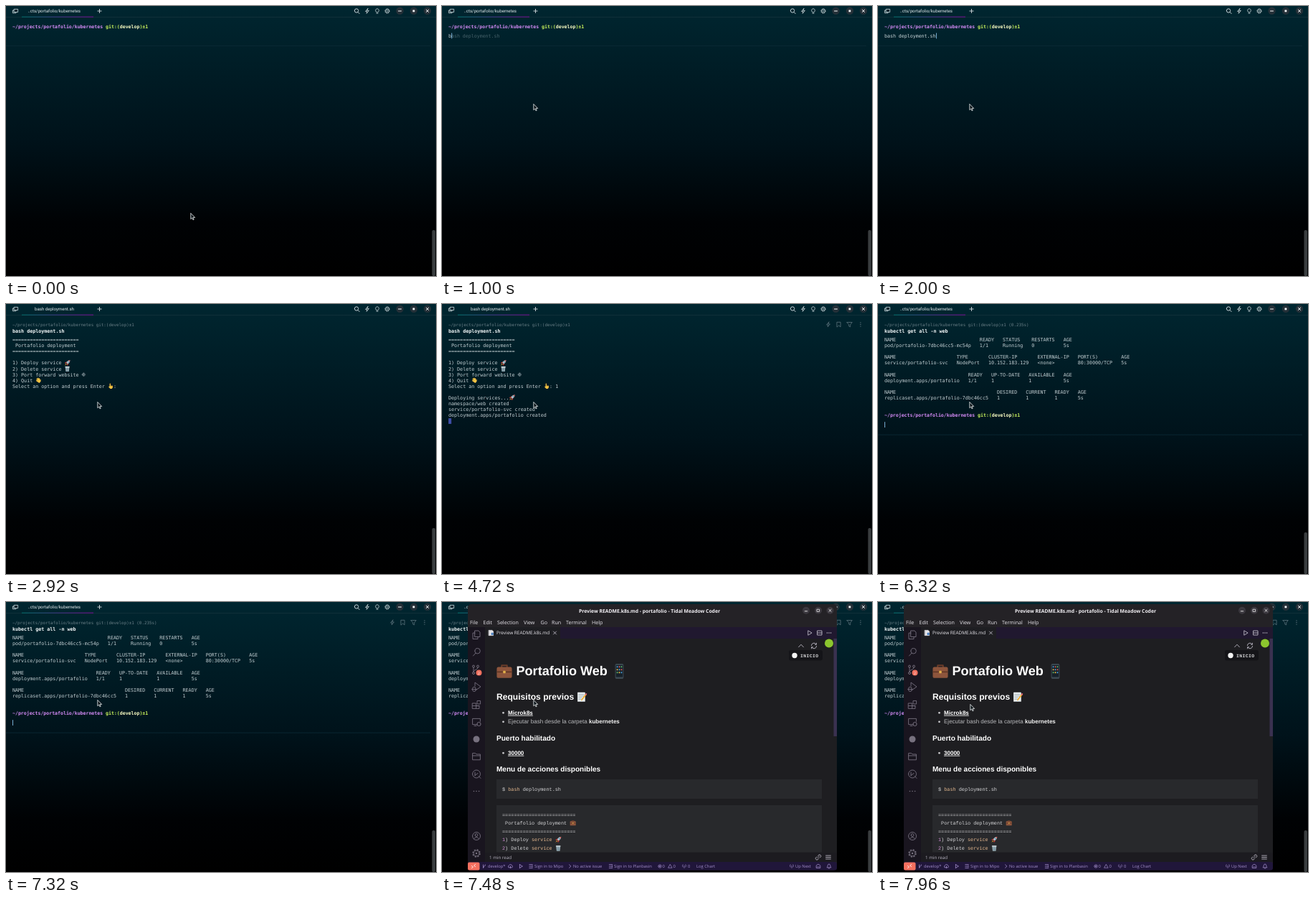
Recreate the animation shown at these times as an HTML page. Size 600 by 376 pixels, loop 8000 ms.

```html
<!DOCTYPE html>
<html lang="es">
<head>
<meta charset="utf-8">
<title>Portafolio deployment</title>
<style>
html, body { margin: 0; width: 100%; height: 100%; overflow: hidden; background: #000; }
svg { display: block; width: 100vw; height: 100vh; }
text { white-space: pre; text-rendering: geometricPrecision; }
.mono { font: 6.7px "DejaVu Sans Mono", monospace; fill: #c3ced2; }
.in { font: 6.6px "DejaVu Sans Mono", monospace; fill: #ccd6da; }
.cmd { font: bold 6.7px "DejaVu Sans Mono", monospace; fill: #f4f8f9; }
.ps { font: bold 6.55px "DejaVu Sans Mono", monospace; }
.dim { font: 5.88px "DejaVu Sans Mono", monospace; fill: #6a7f87; }
.tab { font: 6.13px Roboto, sans-serif; fill: #e4eaec; }
.ui { font: 7.1px "Open Sans", sans-serif; fill: #e8e6ec; }
.bar { font: 5.8px "Open Sans", sans-serif; fill: #a18dc8; }
.doc { font: 8.04px "Liberation Sans", sans-serif; fill: #b9babd; }
.hd { font-family: "Liberation Sans", sans-serif; font-weight: bold; fill: #fff; }
.code { font: 6.83px "Liberation Mono", monospace; fill: #d4d4d6; }
</style>
</head>
<body>
<svg id="stage" viewBox="0 0 600 376">
  <defs>
    <linearGradient id="bg" x2="0" y2="1">
      <stop offset="0" stop-color="#002630"/>
      <stop offset=".5" stop-color="#00121a"/>
      <stop offset=".8" stop-color="#000204"/>
      <stop offset="1" stop-color="#000"/>
    </linearGradient>
    <linearGradient id="accent">
      <stop offset="0" stop-color="#007972"/>
      <stop offset=".5" stop-color="#4a3a92"/>
      <stop offset="1" stop-color="#8a0aa0"/>
    </linearGradient>
  </defs>
</svg>
<script>
const LOOP = 8000, CELL = 4.033, ROW = 8.06, LEFT = 9;
// Scene times in ms
const TYPE = 1000, ACCEPT = 1520, RUN = 2760, MENU = 2840, CLEAR = 5240, GET = 6000, TABLE = 6160, EDITOR = 7480;
const stage = document.getElementById('stage');
const layers = [];
let into = stage;

function add(tag, attrs, text) {
  const el = document.createElementNS('http://www.w3.org/2000/svg', tag);
  for (const k in attrs) el.setAttribute(k, attrs[k]);
  if (text !== undefined) el.textContent = text;
  into.append(el);
  return el;
}
function group(build, attrs = {}) {
  const outer = into, g = add('g', attrs);
  into = g;
  build();
  into = outer;
  return g;
}
// Shows a group only inside the given [start, end] spans
function during(spans, build) {
  layers.push({ spans, el: group(build) });
}
const rect = (x, y, width, height, fill, rx = 0) => add('rect', { x, y, width, height, fill, rx });
const dot = (cx, cy, r, fill) => add('circle', { cx, cy, r, fill });
const label = (x, y, cls, text, extra = {}) => add('text', { x, y, class: cls, ...extra }, text);
const line = (x, y, d, stroke, w = .9, fill = 'none') => add('path', {
  d, stroke, fill, 'stroke-width': w, transform: `translate(${x} ${y})`,
  'stroke-linecap': 'round', 'stroke-linejoin': 'round'
});
const shape = (d, fill) => add('path', { d, fill });
// A text line made of [string, colour] pieces
function pieces(x, y, cls, parts) {
  const t = label(x, y, cls, '');
  const outer = into;
  into = t;
  for (const [s, fill] of parts) add('tspan', fill ? { fill } : {}, s);
  into = outer;
}

// Pictograms on a 10 x 10 grid
const picts = {
  rocket() {
    shape('M9.8.2C6.8.3 4.5 2 3.1 4.6L5.4 6.9C8 5.5 9.7 3.2 9.8.2Z', '#b9c8d0');
    shape('M9.8.2 7.2.9 9.1 2.8ZM4.2 3.4 1.4 4 .4 6 3.1 5.6ZM6.6 5.8 6 8.6 4 9.6 4.4 6.9Z', '#d9453d');
    shape('M2.8 6.2.4 9.6 3.9 7.3Z', '#f3a72f');
    dot(6.8, 3.3, 1, '#3e7fa5');
  },
  bin() {
    shape('M1.5 2.5H8.5L7.7 9.8H2.3Z', '#9fb4bd');
    rect(1, 1, 8, 1.8, '#d7e3e7', .8);
    line(0, 0, 'M3.4 4 3.8 8.6M5 4V8.6M6.6 4 6.2 8.6', '#5d7884', .6);
  },
  globe() {
    line(5, 5, 'M-3.2 0A3.2 3.2 0 1 1 3.2 0 3.2 3.2 0 1 1-3.2 0ZM-3.2 0H3.2M0-3.2V3.2M0-3.2C-2-1-2 1 0 3.2 2 1 2-1 0-3.2', '#a9b6bb', .6);
  },
  wave() {
    line(0, 0, 'M4 6 2 3.2M5 5 3 1.7M6 4.6 4.7 1.3M7 5 6.6 2M4 7.4 1.6 5.6', '#f6c443', 1.4);
    shape('M3 6 7.4 4 9.2 3.4 9 7.2 6.6 9.6 4.2 8.6Z', '#f6c443');
  },
  point() {
    line(0, 0, 'M4 6V1', '#f6c443', 1.6);
    shape('M3 4.4 8.4 4.4 8.6 7.4 7 9.8H4.2L1.2 6.4 2.2 5.6 3.2 6.2Z', '#f6c443');
    line(0, 0, 'M5.3 4.6V6.4M6.9 4.6V6.4', '#b9812a', .4);
  },
  brief() {
    line(0, 0, 'M3.3 2.4V1.2H6.7V2.4', '#6b3d2a', .9);
    rect(.2, 2.2, 9.6, 7, '#8d553c', 1);
    rect(.2, 5, 9.6, .7, '#5d3524');
    rect(4.2, 4.6, 1.6, 1.6, '#e2b04a', .3);
  },
  phone() {
    rect(2.2, 0, 5.6, 10, '#3d4a52', .9);
    rect(2.7, .9, 4.6, 7.9, '#17212a');
    const tint = ['#4aa3e0', '#f0b840', '#62c06a', '#e2564f'];
    for (let i = 0; i < 9; i++) rect(3.2 + i % 3 * 1.4, 1.6 + (i / 3 | 0) * 1.9, .8, .9, tint[i * 3 % 4], .2);
  },
  memo() {
    rect(.8, .6, 7.6, 9.2, '#e9eef0', .4);
    line(0, 0, 'M2 2.6H7M2 4.2H7M2 5.8H5M2 7.4H4.4', '#8b9aa2', .5);
    line(0, 0, 'M9.2 2.6 5 8', '#f2b135', 1.3);
    line(0, 0, 'M9.5 2.2 9 2.8', '#e2647a', 1.3);
  }
};
const pict = (name, x, y, size) =>
  group(picts[name], { transform: `translate(${x} ${y}) scale(${size / 10})` });

// Terminal helpers
const base = r => 52.2 + r * ROW;
const col = c => LEFT + c * CELL;
const out = (r, text) => label(LEFT, base(r), 'mono', text);
const small = (name, r, c) => pict(name, col(c), base(r) - 6.4, 8);
const block = (r, c) => rect(col(c), base(r) - 5.9, 4.1, 7.8, '#3d4da6');
const caret = (x, y) => rect(x, y - 6, .9, 7.8, '#86bfe6');
const rule = y => rect(0, y, 592, .8, '#0c2b36');
function prompt(y) {
  pieces(LEFT, y, 'ps', [['~/projects/portafolio/kubernetes ', '#d58bf6'], ['git:(', '#c6f05c'],
    ['develop', '#fbfdc4'], [')±1', '#c6f05c']]);
}
function ranBlock(time, cmd) {
  label(LEFT, 30.5, 'dim', '~/projects/portafolio/kubernetes git:(develop)±1' + time);
  label(LEFT, 39.8, 'cmd', cmd);
}
const bolt = 'M.8-3.4-2.4.6H-.2L-.8 3.4 2.4-.6H.2Z';

// Background and top bar
rect(0, 0, 600, 376, 'url(#bg)');
rect(0, 15, 600, .7, '#17343d');
rect(22, 14.7, 100, .9, 'url(#accent)');
const pale = '#d5dde0';
line(13, 7, 'M-1.5-2.6H3.6V1.6H-1.5ZM-2-1H-3.6V2.8H1V2', pale, .8);
line(130.5, 7, 'M-2.6 0H2.6M0-2.6V2.6', pale);
line(489, 6.5, 'M-2.7 0A2.7 2.7 0 1 1 2.7 0 2.7 2.7 0 1 1-2.7 0M2 2 4.2 4.2', pale);
line(504, 7, bolt, pale, .8);
line(518, 7, 'M-1.2 1.6C-3.4-.4-2.2-3.2 0-3.2S3.4-.4 1.2 1.6ZM-1 3.2H1', pale, .8);
const gear = (x, y, c, s = 1) => {
  add('circle', { cx: x, cy: y, r: 3.1 * s, fill: 'none', stroke: c, 'stroke-width': .9 * s, 'stroke-dasharray': `${1.4 * s} ${1.03 * s}` });
  add('circle', { cx: x, cy: y, r: 2.4 * s, fill: 'none', stroke: c, 'stroke-width': .8 });
  dot(x, y, .8 * s, c);
};
gear(532, 7, pale);
for (const x of [549.5, 569, 588]) dot(x, 6.8, 5.2, '#243038');
line(549.5, 7, 'M-2 0H2', '#fff', 1);
rect(567.5, 5.5, 2.8, 2.8, '#fff');
line(588, 6.8, 'M-1.6-1.6 1.6 1.6M1.6-1.6-1.6 1.6', '#fff', 1);
during([[0, MENU], [CLEAR, LOOP]], () => label(30.5, 9.2, 'tab', '..cts/portafolio/kubernetes'));
during([[MENU, CLEAR]], () => label(40, 9.2, 'tab', 'bash deployment.sh'));
during([[0, CLEAR]], () => rect(594.5, 312, 4.5, 64, '#3a3e40', 2));
during([[CLEAR, LOOP]], () => rect(594.5, 318, 4.5, 58, '#3a3e40', 2));

// Empty prompt, first command
during([[0, RUN], [CLEAR, GET]], () => { prompt(30.6); rule(55); });
during([[720, TYPE]], () => caret(LEFT, 43.6));
during([[TYPE, ACCEPT]], () => {
  pieces(LEFT, 43.6, 'in', [['b'], ['ash deployment.sh', '#47626b']]);
  caret(13.2, 43.6);
});
during([[ACCEPT, RUN]], () => {
  label(LEFT, 43.6, 'in', 'bash deployment.sh');
  caret(81, 43.6);
});

// Deployment menu
during([[RUN, CLEAR]], () => ranBlock('', 'bash deployment.sh'));
during([[RUN, MENU]], () => block(0, 0));
during([[MENU, CLEAR]], () => {
  const bars = '='.repeat(23);
  [bars, ' Portafolio deployment', bars, '', '1) Deploy service', '2) Delete service', '3) Port forward website',
    '4) Quit', 'Select an option and press Enter   :'].forEach((s, r) => out(r, s));
  small('rocket', 4, 18);
  small('bin', 5, 18);
  pict('globe', col(24) - .8, base(6) - 5.6, 6.6);
  small('wave', 7, 8);
  small('point', 8, 33);
});
during([[3200, 3600]], () => block(8, 37));
during([[3600, CLEAR]], () => label(col(37), base(8), 'mono', '1'));
during([[3600, 4000]], () => block(8, 38));
during([[4000, CLEAR]], () => { out(10, 'Deploying services...'); small('rocket', 10, 21); });
[[4240, 'namespace/web created'], [4480, 'service/portafolio-svc created'],
  [4720, 'deployment.apps/portafolio created']].forEach(([at, text], i) => {
  during([[at, CLEAR]], () => out(11 + i, text));
});
[4000, 4240, 4480, 4720, CLEAR].forEach((at, i, all) => {
  if (i < 4) during([[at, all[i + 1]]], () => block(11 + i, 0));
});

// Second command
during([[CLEAR, GET]], () => {
  pieces(LEFT, 43.6, 'in', [['kubectl', '#b4ea66'], [' get all -n web']]);
  caret(96.6, 43.6);
});
during([[GET, TABLE]], () => ranBlock('', 'kubectl get all -n web'));
during([[TABLE, LOOP]], () => {
  ranBlock(' (0.235s)', 'kubectl get all -n web');
  const table = (row, widths, ...lines) => lines.forEach((cells, i) =>
    out(row + i, cells.split(' ').map((c, k) => c.padEnd(widths[k])).join('')));
  table(0, [33, 8, 10, 11, 3], 'NAME READY STATUS RESTARTS AGE',
    'pod/portafolio-7dbc46cc5-mc54p 1/1 Running 0 5s');
  table(3, [25, 11, 17, 14, 15, 3], 'NAME TYPE CLUSTER-IP EXTERNAL-IP PORT(S) AGE',
    'service/portafolio-svc NodePort 10.152.183.129 <none> 80:30000/TCP 5s');
  table(6, [29, 8, 13, 12, 3], 'NAME READY UP-TO-DATE AVAILABLE AGE',
    'deployment.apps/portafolio 1/1 1 1 5s');
  table(9, [39, 10, 10, 8, 3], 'NAME DESIRED CURRENT READY AGE',
    'replicaset.apps/portafolio-7dbc46cc5 1 1 1 5s');
  prompt(157.3);
});
during([[TABLE, EDITOR]], () => rule(181.7));
during([[TABLE, 6520], [7000, EDITOR]], () => caret(LEFT, 170.2));
during([[3200, CLEAR], [6520, LOOP]], () => {
  const c = '#5d747d';
  line(539, 28.5, bolt, c, .8);
  line(553.7, 28.5, 'M-2.4-3.2H2.4V3.4L0 1.4-2.4 3.4Z', c, .8);
  line(568.7, 28.5, 'M-3.6-3H3.6L1 .4V3.4L-1 2.4V.4Z', c, .8);
  for (const d of [-2.6, 0, 2.6]) dot(584, 28.5 + d, .7, c);
});

// Editor window
during([[EDITOR, LOOP]], () => {
  const grey = '#77717f', soft = '#bcb8c4', violet = '#a18dc8';
  rect(36, 3, 515, 370.5, '#242226', 5);
  rect(36, 35, 24, 327, '#19151f');
  rect(60, 35, 491, 16, '#20182f');
  rect(60, 35, 105, 16, '#1e1e22');
  rect(60, 51, 491, 298, '#1e1e21');
  rect(60, 349, 491, 13, '#1c1b20');
  rect(36, 362, 515, 11.5, '#20163a', 3);
  label(191, 14.5, 'ui', 'Preview README.k8s.md - portafolio - Tidal Meadow Coder', { style: 'font-size:6.8px;font-weight:bold;fill:#f4f2f6' });
  for (const x of [508, 525, 541.5]) dot(x, 11.8, 5, '#3b383f');
  line(508, 12.8, 'M-1.7 0H1.7', '#eee');
  line(525, 11.8, 'M-1.6-1.6H1.6V1.6H-1.6Z', '#eee', .8);
  line(541.5, 11.8, 'M-1.6-1.6 1.6 1.6M1.6-1.6-1.6 1.6', '#eee');
  [[39, 'File'], [57.5, 'Edit'], [77, 'Selection'], [114, 'View'], [137.5, 'Go'], [153, 'Run'],
    [173, 'Terminal'], [209, 'Help']].forEach(([x, s]) => label(x, 30.5, 'ui', s));
  line(68.5, 43, 'M-3-3.6H1.6L3-2V3.6H-3Z', '#e6e6ea', .8, '#e6e6ea');
  dot(70.2, 44.4, 1.8, '#4a80c0');
  label(76, 45.3, 'ui', 'Preview README.k8s.md', { style: 'font-size:6.45px' });
  line(157.5, 43, 'M-2-2 2 2M2-2-2 2', soft);
  line(513.5, 43, 'M-2.4-3 2.6 0-2.4 3Z', soft);
  line(527, 43, 'M-3-3H3V3H-3ZM-3 0H3', soft);
  for (const d of [-2.6, 0, 2.6]) dot(540 + d, 43, .8, soft);

  // Activity bar
  line(48, 45.5, 'M-2-5.5H3L5-3.4V3H-2ZM-2-2.4H-5V6H2V3', grey);
  line(48.5, 69, 'M-2.6-.8A3.7 3.7 0 1 1 4.8-.8 3.7 3.7 0 1 1-2.6-.8M-1.4 2-5 6', grey);
  line(47, 94, 'M-3-3V4M3-3C3 1-3 0-3 3', grey);
  for (const [x, y] of [[44, 89.6], [44, 99], [50, 89.6]]) add('circle', { cx: x, cy: y, r: 1.5, fill: '#19151f', stroke: grey });
  dot(51.5, 98.5, 4, '#f0705f');
  label(50, 100.5, 'bar', '2', { style: 'fill:#fff;font-size:5px' });
  line(48, 118, 'M-2-1V-6L6 0-1 5M-5.4 2.5A2.2 2.2 0 1 1-1 2.5V4.4A2.2 2.2 0 1 1-5.4 4.4ZM-6.4 3.6H0', grey);
  line(48, 143, 'M-5.4-2H-.4V5.4H-5.4ZM-5.4 1.6H4V5.4H-.4M1.4-5.4H5.6V-1H1.4ZM-.4 1.6H4', grey);
  line(48, 167, 'M1 3.6H-5.4V-4.6H5.4V-.6M-3 5.4H0', grey);
  add('circle', { cx: 51.5, cy: 170, r: 2.6, fill: 'none', stroke: grey });
  dot(48, 191, 4.5, grey);
  line(48, 215, 'M-5.4 4.4V-4.4H-1.4L0-3H5.4V4.4ZM-5.4-1H5.4', grey);
  line(48, 239.5, 'M-5.5 0A5.5 5.5 0 1 1 5.5 0 5.5 5.5 0 1 1-5.5 0M-2-2.4V2.4M2-1C2 1-2 0-2 2M3 3 6 6', grey);
  for (const d of [-3.6, 0, 3.6]) dot(48 + d, 263.5, .8, grey);
  line(48, 326, 'M-5.5 0A5.5 5.5 0 1 1 5.5 0 5.5 5.5 0 1 1-5.5 0M-1.9-1.4A1.9 1.9 0 1 1 1.9-1.4 1.9 1.9 0 1 1-1.9-1.4M-3.4 4C-3 .8 3 .8 3.4 4', grey);
  gear(48, 350, grey, 1.6);

  // Preview
  line(501, 61, 'M-3.4 1.8 0-1.8 3.4 1.8', soft);
  line(519, 61, 'M-3.6-.4A3.6 3.6 0 0 1 3-2.2M3.4-3.8V-1.8H1.4M3.6.4A3.6 3.6 0 0 1-3 2.2M-3.4 3.8V1.8H-1.4', soft);
  rect(484, 67, 47, 14.5, '#141418', 3);
  dot(492, 74.5, 3.7, '#f2f2f2');
  label(500, 76.9, 'code', 'INICIO', { style: 'font-size:6.4px;font-weight:bold;letter-spacing:.4px' });
  rect(546.5, 51, 4.5, 136, '#3a3150');
  dot(540, 57.5, 6, '#8cc62e');
  pict('brief', 76, 85.6, 22);
  label(103.5, 102.3, 'hd', 'Portafolio Web', { 'font-size': 18.1 });
  pict('phone', 237, 86, 21);
  label(76, 136.2, 'hd', 'Requisitos previos', { 'font-size': 12.1 });
  pict('memo', 188, 125, 14);
  const link = { style: 'font-weight:bold;fill:#fff;text-decoration:underline' };
  label(92, 156.8, 'doc', 'Microk8s', link);
  const item = label(92, 169.2, 'doc', 'Ejecutar bash desde la carpeta ');
  item.append(add('tspan', { style: 'font-weight:bold;fill:#f2f2f2' }, 'kubernetes'));
  label(76, 193, 'hd', 'Puerto habilitado', { 'font-size': 10.05 });
  label(92, 212.8, 'doc', '30000', link);
  for (const y of [154.3, 166.8, 210.3]) dot(85.5, y, 1.4, '#c8c8ca');
  label(76, 236.4, 'hd', 'Menu de acciones disponibles', { 'font-size': 10.05 });
  rect(76, 247, 454, 27, '#28292c');
  rect(76, 283, 454, 65.5, '#28292c');
  const tan = '#e3b78e', pink = '#cf8fd2';
  pieces(84, 262.6, 'code', [['$ '], ['bash', tan], [' deployment.sh']]);
  label(84, 298.6, 'code', '='.repeat(25));
  label(84, 310.2, 'code', ' Portafolio deployment');
  pict('brief', 178.5, 303.5, 8.4);
  label(84, 321.8, 'code', '='.repeat(25));
  pieces(84, 333.4, 'code', [['1', pink], [') Deploy '], ['service', tan]]);
  pict('rocket', 158, 326.8, 8.4);
  pieces(84, 345, 'code', [['2', pink], [') Delete '], ['service', tan]]);
  pict('bin', 158, 338.4, 8.4);
  label(66, 357.8, 'bar', '1 min read', { style: 'font-size:6.2px;fill:#b9b5c2' });
  line(525, 355.5, 'M-1 1 1.4-1.4M-.4-2 1-3.4A2 2 0 0 1 3.6-.8L2.2.6M.4 2-1 3.4A2 2 0 0 1-3.6.8L-2.2-.6', soft);
  line(539, 355.5, 'M-3.4-2.4H3.4M-3.4 0H3.4M-3.4 2.4H3.4', soft);

  // Status bar
  rect(36, 362.5, 16.5, 11, '#f4705f', 2);
  line(44, 368, 'M-2.6-.6-.6 1-2.6 2.6M2.6-2.6.6-1 2.6.6', '#fff', .8);
  line(59, 368, 'M-1.4-2V2M1.4-2C1.4.6-1.4 0-1.4 2', violet);
  line(95.5, 368, 'M-2.8 1.4A2.2 2.2 0 0 1-2-1.4 2.4 2.4 0 0 1 2.2-1 1.6 1.6 0 0 1 2.4 1.6ZM0 2.6V0', violet, .8);
  line(110, 368, 'M-1.6-2.6V2.6M-1.6-2.4 2.4 0-1.6 2.4', violet, .8);
  for (const x of [124, 235.5]) line(x, 368, 'M-2.2-2.4H2.2M-2.2 0H1M-2.2 2.4H2.2M2-1V1', violet, .8);
  line(178.5, 368, 'M-1-2.2 1.4 0-1 2.2', violet, .8);
  [[64, 'develop*'], [129, 'Sign in to Mipo'], [183, 'No active issue'], [240, 'Sign in to Planbasin'],
    [307.5, '0'], [322.5, '0'], [343, '0'], [355, 'Log Chart'], [493, 'Up Next']]
    .forEach(([x, s]) => label(x, 370.1, 'bar', s));
  line(304, 368, 'M-2.2 0A2.2 2.2 0 1 1 2.2 0 2.2 2.2 0 1 1-2.2 0M-.9-.9.9.9M.9-.9-.9.9', violet, .7);
  line(318.5, 368, 'M0-2.4 2.6 2.2H-2.6Z', violet, .7);
  for (const x of [338, 488]) line(x, 368, 'M0-.8V2.4M-2-2.2A2.8 2.8 0 0 0-2 1M2-2.2A2.8 2.8 0 0 1 2 1', violet, .7);
  line(525, 368, 'M-2.8 2V-.4C-2-3.4 2-3.4 2.8-.4V2ZM-1 .4V1M1 .4V1', violet, .8);
  line(540, 368, 'M-2.6 1.6C-1.2 0-2.4-3 0-3S1.2 0 2.6 1.6ZM-.6 2.8H.6', violet, .8);
});

const pointer = line(0, 0, 'M.3.4V8.2L2.2 6.6 3.5 9.4 4.7 8.8 3.4 6.1H5.8Z', '#eef2f3', .8, '#10191d');

// Pointer path: [ms, x, y]
const path = [[0, 257.5, 288.5], [40, 257.5, 288.5], [560, 127.5, 136.5], [7760, 127.5, 136.5],
  [7920, 128.5, 142.5], [LOOP, 128.5, 142.5]];
const ease = u => u * u * (3 - 2 * u);

function draw(t) {
  for (const { spans, el } of layers)
    el.style.display = spans.some(([a, b]) => t >= a && t < b) ? '' : 'none';
  const i = path.findIndex(p => p[0] > t), [t0, x0, y0] = path[i - 1], [t1, x1, y1] = path[i];
  const u = ease((t - t0) / (t1 - t0));
  pointer.setAttribute('transform', `translate(${x0 + (x1 - x0) * u} ${y0 + (y1 - y0) * u})`);
}

const start = performance.now();
function tick() {
  draw((performance.now() - start) % LOOP);
  requestAnimationFrame(tick);
}
tick();
</script>
</body>
</html>
```
